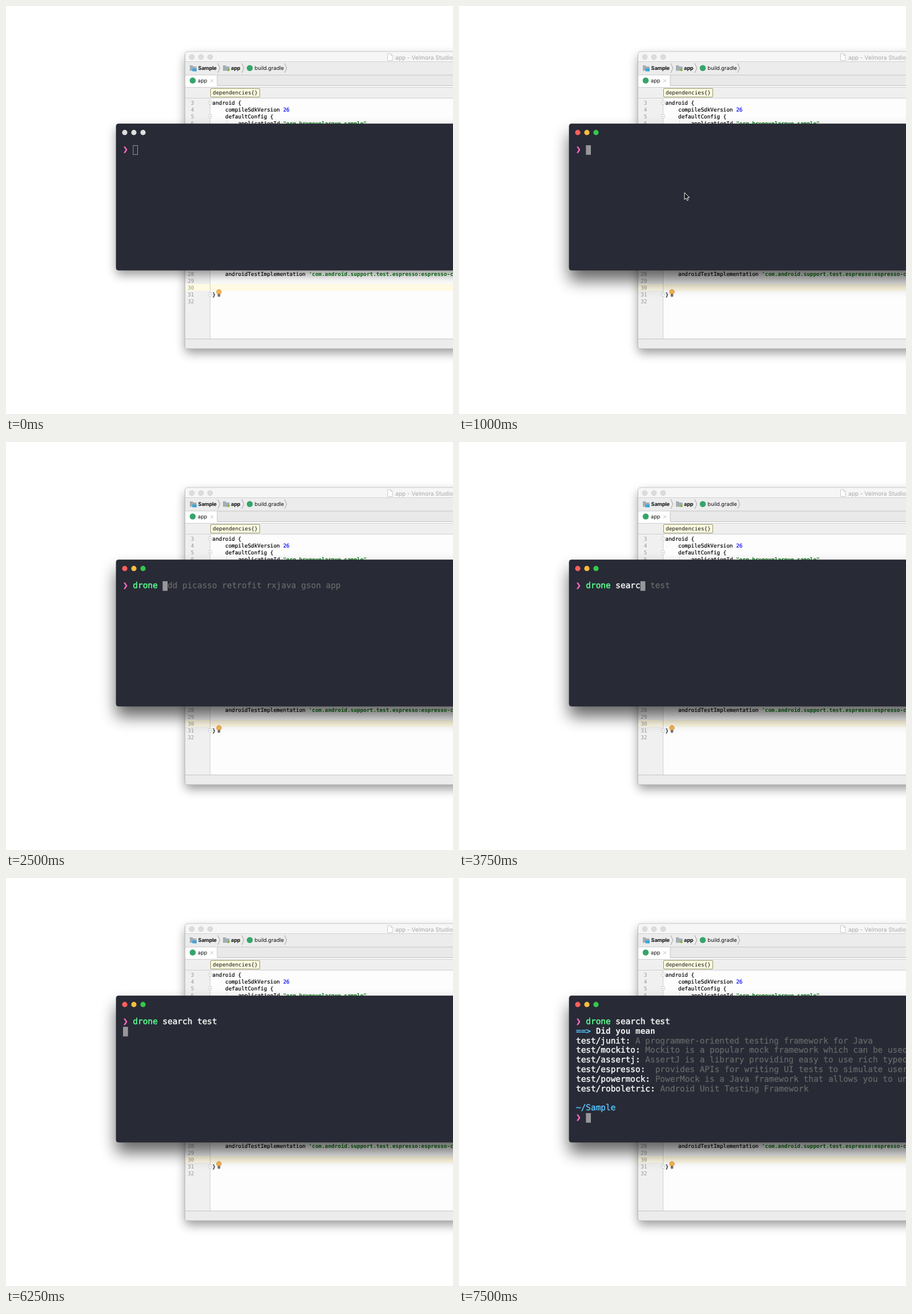
Animation of 783x715 px, one loop 8 s. Source, as an HTML page:

```html
<!DOCTYPE html>
<html lang="en">
<head>
<meta charset="utf-8">
<title>Terminal over editor</title>
<style>
  html, body { margin: 0; width: 100%; height: 100%; overflow: hidden; background: #fff; }
  svg { display: block; width: 783px; height: 715px; }
  text { white-space: pre; text-rendering: geometricPrecision; }
  .mono { font-family: "DejaVu Sans Mono", monospace; }
  .ui { font-family: Inter, sans-serif; }
</style>
</head>
<body>
<svg id="stage" viewBox="0 0 783 715" xmlns="http://www.w3.org/2000/svg">
  <defs>
    <filter id="soft" x="-20%" y="-40%" width="140%" height="180%" color-interpolation-filters="sRGB"><feGaussianBlur stdDeviation="9"/></filter>
    <filter id="deep" x="-20%" y="-40%" width="140%" height="180%" color-interpolation-filters="sRGB"><feGaussianBlur stdDeviation="14"/></filter>
  </defs>
  <g id="editor"></g>
  <g id="terminal"></g>
  <g id="pointer">
    <path d="M0 0V12.2L2.8 9.6L4.6 13.8L6.7 12.9L4.9 8.8H8.8Z" fill="#111" stroke="#fff" stroke-width="1" stroke-linejoin="round"/>
  </g>
</svg>
<script>
const LOOP = 8000;
const NS = 'http://www.w3.org/2000/svg';
const $ = id => document.getElementById(id);

function add(parent, tag, attrs, content) {
  const el = document.createElementNS(NS, tag);
  for (const k in attrs) el.setAttribute(k, attrs[k]);
  if (content !== undefined) el.textContent = content;
  parent.appendChild(el);
  return el;
}
const rect = (p, x, y, width, height, fill, more) => add(p, 'rect', { x, y, width, height, fill, ...more });
const dot = (p, cx, cy, r, fill, more) => add(p, 'circle', { cx, cy, r, fill, ...more });
const path = (p, d, stroke, more) => add(p, 'path', { d, stroke, fill: 'none', ...more });
const label = (p, x, y, size, str, fill, more) =>
  add(p, 'text', { class: 'ui', x, y, 'font-size': size, fill, ...more }, str);

/* ---------- editor window ---------- */

const editor = $('editor');
const CODE = 9.35, CODE_W = CODE * 0.60205;
const lineY = n => 172.8 + (n - 3) * 12;

// runs: [text, fill, bold]
function code(n, indent, ...runs) {
  let x = 361.6 + indent * CODE_W;
  for (const [str, fill, bold] of runs) {
    add(editor, 'text', {
      class: 'mono', x, y: lineY(n), 'font-size': CODE, fill, 'font-weight': bold ? 700 : 400,
      stroke: fill, 'stroke-width': bold ? 0 : 0.2
    }, str);
    x += str.length * CODE_W;
  }
}

function folder(x, badge) {
  path(editor, `M${x} 104h4.5l1.5 2h5.5v7.5h-11.5z`, 'none', { fill: '#a3adb5' });
  badge();
}

function drawEditor() {
  rect(editor, 314, 88, 700, 520, '#000', { rx: 5, opacity: 0.4, filter: 'url(#soft)' });
  rect(editor, 313.5, 80, 700, 520.5, '#fdfdfd', { rx: 4.5, stroke: '#b9b9b9', 'stroke-width': 1 });
  path(editor, 'M314 98V85q0-4.5 4.5-4.5H783V98z', 'none', { fill: '#f6f6f6' });
  rect(editor, 314, 98, 469, 23, '#ececec');
  rect(editor, 314, 97, 469, 1, '#d3d3d3');
  rect(editor, 314, 121, 469, 19, '#e9e9e9');
  rect(editor, 314, 120.5, 469, 1, '#c6c6c6');
  rect(editor, 314, 139, 469, 1, '#bdbdbd');
  rect(editor, 314, 140, 469, 2, '#fff');
  rect(editor, 314, 121.5, 56, 20, '#fff');
  rect(editor, 369.5, 121.5, 1, 18, '#c4c4c4');
  rect(editor, 314, 142, 469, 20, '#efefef');
  rect(editor, 314, 142, 469, 1, '#d0d0d0');
  rect(editor, 314, 161, 469, 1, '#cfcfcf');
  rect(editor, 314, 162, 43, 421, '#f0f0f0');
  rect(editor, 314, 487, 469, 12, '#fffae3');
  rect(editor, 357, 162, 1, 421, '#cfcfcf');
  path(editor, 'M314 583H783V600H318.5q-4.5 0-4.5-4.5z', 'none', { fill: '#ececec' });
  rect(editor, 314, 583, 469, 1, '#c3c3c3');

  for (const x of [325.5, 341.5, 357.5])
    dot(editor, x, 89.5, 4.5, '#dcdcdc', { stroke: '#cdcdcd', 'stroke-width': 0.7 });

  path(editor, 'M668.5 83.5h5.5l3 3v9h-8.5zM674 83.5v3h3', '#c2c2c2', { fill: '#fff', 'stroke-width': 0.8 });
  label(editor, 682, 93.6, 10.1, 'app - Velmora Studio', '#a8a8a8');

  folder(322, () => rect(editor, 326.5, 109.5, 7.5, 5, '#3aa5d8'));
  label(editor, 336.6, 112.2, 9.1, 'Sample', '#111', { 'font-weight': 700, 'letter-spacing': -0.15 });
  folder(380, () => dot(editor, 389.5, 112, 2.3, '#8cb63c'));
  label(editor, 394, 112.2, 9.1, 'app', '#111', { 'font-weight': 700, 'letter-spacing': -0.15 });
  label(editor, 435.6, 112.2, 9.2, 'build.gradle', '#111');
  for (const x of [371, 413, 488])
    path(editor, `M${x} 100.5l3.8 8.3l-3.8 8.3`, '#8e8e8e', { 'stroke-width': 0.8 });
  dot(editor, 427, 108.7, 5.3, '#35a56a');
  dot(editor, 327, 130.5, 5.3, '#35a56a');
  label(editor, 336, 134, 9.2, 'app', '#111');
  path(editor, 'M358 128.5l5 5m0-5l-5 5', '#b5b5b5', { 'stroke-width': 0.9 });

  rect(editor, 358.5, 144.5, 86, 15, '#fffee2', { rx: 1.5, stroke: '#93936a', 'stroke-width': 1 });
  add(editor, 'text', { class: 'mono', x: 362, y: 155.3, 'font-size': CODE, fill: '#111' }, 'dependencies{}');

  for (const n of [3, 4, 5, 6, 28, 29, 30, 31, 32])
    add(editor, 'text', {
      class: 'mono', x: 329.5, y: lineY(n), 'font-size': CODE, fill: '#989898', 'text-anchor': 'end'
    }, n);

  rect(editor, 386, 199, 0.7, 12, '#dedede');
  const ink = '#000', str = '#087b10';
  code(3, 0, ['android {', ink]);
  code(4, 4, ['compileSdkVersion ', ink], ['26', '#0000ff']);
  code(5, 4, ['defaultConfig {', ink]);
  code(6, 8, ['applicationId ', ink], ['"org.brunovelarque.sample"', str, true]);
  code(28, 4, ['androidTestImplementation ', ink],
    ["'com.android.support.test.espresso:espresso-core:3.0.1'", str, true]);
  code(31, 0, ['}', ink]);

  for (const y of [169.5, 193.5, 505.5]) {
    rect(editor, 354.5, y - 3, 6, 6, '#fff', { rx: 1, stroke: '#c5c5c5', 'stroke-width': 0.8 });
    rect(editor, 356, y - 0.4, 3, 0.8, '#a8a8a8');
  }
  dot(editor, 373, 501, 4.3, '#f5b455', { stroke: '#d99338', 'stroke-width': 0.7 });
  rect(editor, 370.8, 504.5, 4.4, 5, '#77706a', { rx: 1 });
}

/* ---------- terminal window ---------- */

const term = $('terminal');
const FONT = 14.4, CELL = FONT * 0.60205, ROW = 16.8, LEFT = 205, TOP = 244;
const C = { white: '#f1f1f0', grey: '#686868', green: '#5af78e', red: '#ff5c57', pink: '#ff6ac1', blue: '#57c7ff' };
const colX = col => LEFT + col * CELL;

const rest = rect(term, 193, 214, 800, 257, '#000', { rx: 5, opacity: 0.4, filter: 'url(#soft)' });
const lifted = rect(term, 193, 224, 800, 257, '#000', { rx: 5, opacity: 0.6, filter: 'url(#deep)' });
rect(term, 193, 206.5, 800, 256.5, '#282a36', { rx: 4, stroke: '#1f212b', 'stroke-width': 0.7 });
const lights = [208, 224, 240].map(x => dot(term, x, 221.7, 4.6, '#dedede'));
const screen = add(term, 'g', {});
const cursor = rect(term, 0, 0, CELL, ROW, '#97979b');

function put(row, col, str, fill, weight = 0.4, bold = false) {
  add(screen, 'text', {
    class: 'mono', x: colX(col), y: TOP + row * ROW + 12, 'font-size': FONT, fill,
    'font-weight': bold ? 700 : 400, stroke: fill, 'stroke-width': weight
  }, str);
}

const HISTORY = 'drone add picasso retrofit rxjava gson app';
const SEARCH = 'drone search test';

// [start, typed text, suggested command]
const TYPING = [
  [0, '', ''],
  [1750, 'd', HISTORY],
  [2000, 'dro', HISTORY],
  [2250, 'drone', HISTORY],
  [2500, 'drone ', HISTORY],
  [3000, 'drone s', SEARCH],
  [3250, 'drone se', SEARCH],
  [3500, 'drone sear', SEARCH],
  [3750, 'drone searc', SEARCH],
  [4250, 'drone search', SEARCH],
  [4500, 'drone search t', SEARCH],
  [4750, SEARCH, SEARCH]
];

const RESULTS = [
  ['junit', 'A programmer-oriented testing framework for Java'],
  ['mockito', 'Mockito is a popular mock framework which can be used in unit testing'],
  ['assertj', 'AssertJ is a library providing easy to use rich typed assertions'],
  ['espresso', ' provides APIs for writing UI tests to simulate user interactions'],
  ['powermock', 'PowerMock is a Java framework that allows you to unit test code'],
  ['roboletric', 'Android Unit Testing Framework']
];

// [start, x, y]; hidden outside these steps
const POINTER = [[250, 494, 570], [500, 426, 363], [750, 422.5, 369], [1000, 395, 327]];
const POINTER_END = 1250, ACTIVE = 1000, ENTER = 5000, FOUND = 6750, DONE = 7500;

const latest = (steps, t) => steps.filter(s => s[0] <= t).pop();

function prompt(row) { put(row, 0, '❯', C.pink, 0.5, true); }

function drawScreen(t) {
  screen.textContent = '';
  const [, typed, hint] = latest(TYPING, t);
  const head = typed.slice(0, 5);
  prompt(0);
  put(0, 2, head, head === 'drone' ? C.green : C.red, 0.55);
  put(0, 7, typed.slice(5), C.white, 0.5);
  // the block cursor hides the first suggested character
  put(0, 3 + typed.length, hint.slice(typed.length + 1), C.grey, 0.25);

  if (t >= FOUND) {
    put(1, 0, '==>', C.blue);
    put(1, 4, 'Did you mean', C.white, 0, true);
    RESULTS.forEach(([name, about], i) => {
      const key = `test/${name}:`;
      put(2 + i, 0, key, C.white, 0.5);
      put(2 + i, key.length + 1, about, C.grey, 0.25);
    });
  }
  if (t >= DONE) {
    put(9, 0, '~/Sample', C.blue);
    prompt(10);
  }
  return t >= DONE ? [10, 2] : t >= FOUND ? [8, 0] : t >= ENTER ? [1, 0] : [0, 2 + typed.length];
}

function drawCursor(row, col, active) {
  const inset = active ? 0 : 0.5;
  const attrs = {
    x: colX(col) + inset, y: TOP + row * ROW + inset, width: CELL - 2 * inset, height: ROW - 2 * inset,
    fill: active ? '#97979b' : 'none', stroke: active ? 'none' : '#97979b'
  };
  for (const k in attrs) cursor.setAttribute(k, attrs[k]);
}

function render(t) {
  const active = t >= ACTIVE;
  rest.style.display = active ? 'none' : '';
  lifted.style.display = active ? '' : 'none';
  ['#fc605c', '#fdbc40', '#34c84a'].forEach((c, i) => lights[i].setAttribute('fill', active ? c : '#dedede'));
  const [row, col] = drawScreen(t);
  drawCursor(row, col, active);

  const at = t < POINTER_END && latest(POINTER, t);
  $('pointer').style.display = at ? '' : 'none';
  if (at) $('pointer').setAttribute('transform', `translate(${at[1]} ${at[2]})`);
}

drawEditor();
function tick() {
  render(performance.now() % LOOP);
  requestAnimationFrame(tick);
}
tick();
</script>
</body>
</html>
```
